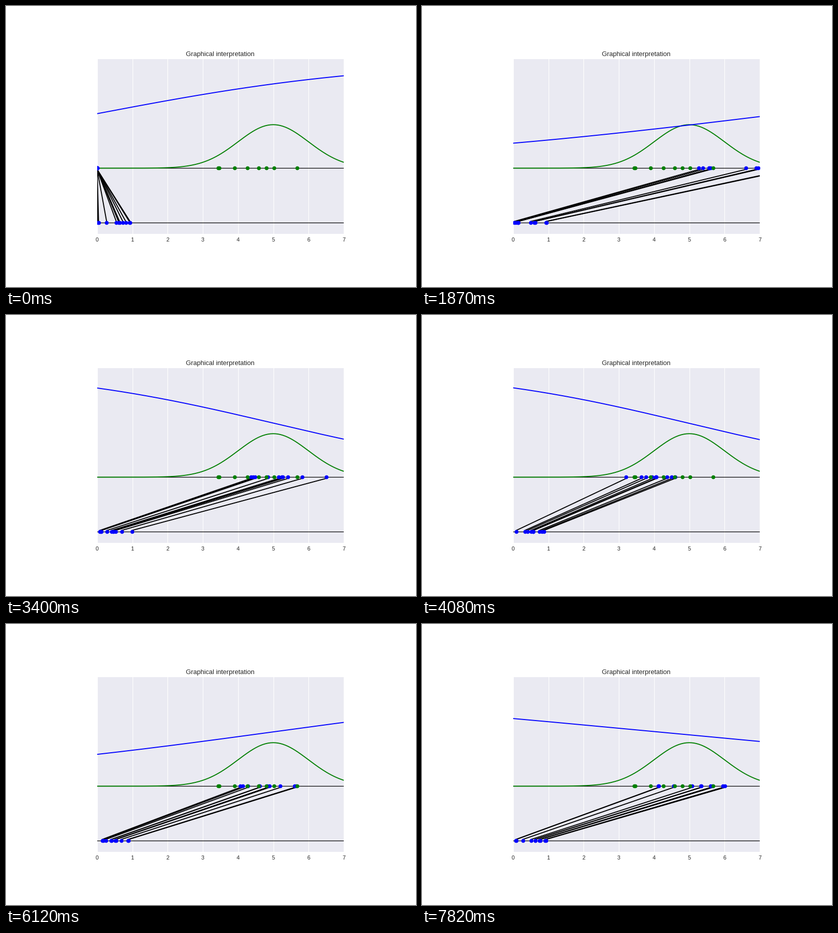
A matplotlib script for the animation above (7.99 s loop, 800 by 550 pixels).

```python
import numpy as np
import matplotlib.pyplot as plt
from matplotlib.animation import FuncAnimation
from matplotlib.collections import LineCollection

W, H, DPI = 800, 550, 100
LEFT, RIGHT, TOP, BOTTOM = 177.8, 659, 104, 445.5
FRAMES, STEP_MS, BATCH = 47, 170, 10
BLUE, GREEN, TEXT = "#0000ff", "#008000", "#262626"


def pt(px):
    return px * 72 / DPI


def sigmoid(v):
    return 1 / (1 + np.exp(-v))


# Key points of the training: classifier sigmoid(weight * x + bias)
# and the generator's shift.
STEPS = np.array([0, 5, 11, 16, 24, 31, 41, 46])
WEIGHT = np.array([0.245, 0.45, 0.158, -0.149, -0.308, 0.202, 0.004, -0.122])
BIAS = np.array([0, -1.6, -1.213, 0.562, 1.513, -0.641, -0.165, 0.491])
SHIFT = np.array([0, 2.1, 5.19, 5.18, 3.057, 2.825, 4.225, 3.947])

# Their rates of change follow the gradients of the adversarial game.
FOOLED = sigmoid(WEIGHT * 1.27 * SHIFT + BIAS)
WEIGHT_RATE = np.gradient(WEIGHT, STEPS)
BIAS_RATE = 2.1 * (1 - sigmoid(5 * WEIGHT + BIAS) - FOOLED)
SHIFT_RATE = 1.95 * WEIGHT * (1 - FOOLED)


def hermite(val, rate, n):
    """Cubic interpolation between key points at step n."""
    i = min(np.searchsorted(STEPS, n, side="right") - 1, len(STEPS) - 2)
    h = STEPS[i + 1] - STEPS[i]
    t = (n - STEPS[i]) / h
    ease = t * t * (3 - 2 * t)
    return (val[i] + (val[i + 1] - val[i]) * ease
            + h * t * (1 - t) * (rate[i] * (1 - t) - rate[i + 1] * t))


def generate(z, n):
    shift = hermite(SHIFT, SHIFT_RATE, n)
    scale = 0.5 * shift + 0.24 * (1 - np.exp(-shift))
    return shift + scale * z


plt.rcParams["font.family"] = "Liberation Sans"
fig = plt.figure(figsize=(W / DPI, H / DPI), dpi=DPI, facecolor="white")
ax = fig.add_axes([LEFT / W, 1 - BOTTOM / H,
                   (RIGHT - LEFT) / W, (BOTTOM - TOP) / H])
ax.set(xlim=(0, 7), ylim=(-1.2, 2), yticks=[], facecolor="#EAEAF2")
ax.set_axisbelow(True)
ax.grid(axis="x", color="white", lw=pt(1.1), ls="-")
for side in ax.spines.values():
    side.set_visible(False)
ax.tick_params(length=0, pad=pt(7.5), labelsize=pt(10.8), labelcolor=TEXT)
fig.text(417.7 / W, 1 - 98 / H, "Graphical interpretation",
         ha="center", va="baseline", size=pt(12.9), color=TEXT)

x = np.linspace(0, 7, 200)
links = LineCollection([], colors="black", lw=pt(1.9), capstyle="round",
                       zorder=1.5)
ax.add_collection(links, autolim=False)
for y in (0, -1):
    ax.plot([0, 7], [y, y], color="black", lw=pt(1.25))
ax.plot(x, 2 * np.exp(-(x - 5)**2 / 2) / np.sqrt(2 * np.pi),
        color=GREEN, lw=pt(1.9))
curve, = ax.plot([], [], color=BLUE, lw=pt(1.9))

dot = dict(ls="", marker="o", ms=pt(7.6), mew=0)
noise, = ax.plot([], [], color=BLUE, **dot)
fake, = ax.plot([], [], color=BLUE, **dot)
real = np.array([3.43, 3.47, 3.905, 4.27, 4.585, 4.8, 5.025, 5.67])
ax.plot(real, 0 * real, color=GREEN, **dot)


def update(n):
    w = hermite(WEIGHT, WEIGHT_RATE, n)
    b = hermite(BIAS, BIAS_RATE, n)
    z = np.random.default_rng(n).uniform(0, 1, BATCH)
    g = generate(z, n)
    curve.set_data(x, 2 * sigmoid(w * x + b))
    noise.set_data(z, np.full(BATCH, -1))
    fake.set_data(g, np.zeros(BATCH))
    links.set_segments([[(p, -0.977), (q, -0.023)] for p, q in zip(z, g)])
    return links, curve, noise, fake


anim = FuncAnimation(fig, update, frames=FRAMES, interval=STEP_MS,
                     init_func=lambda: update(0), repeat=True, repeat_delay=0)
plt.show()
```
